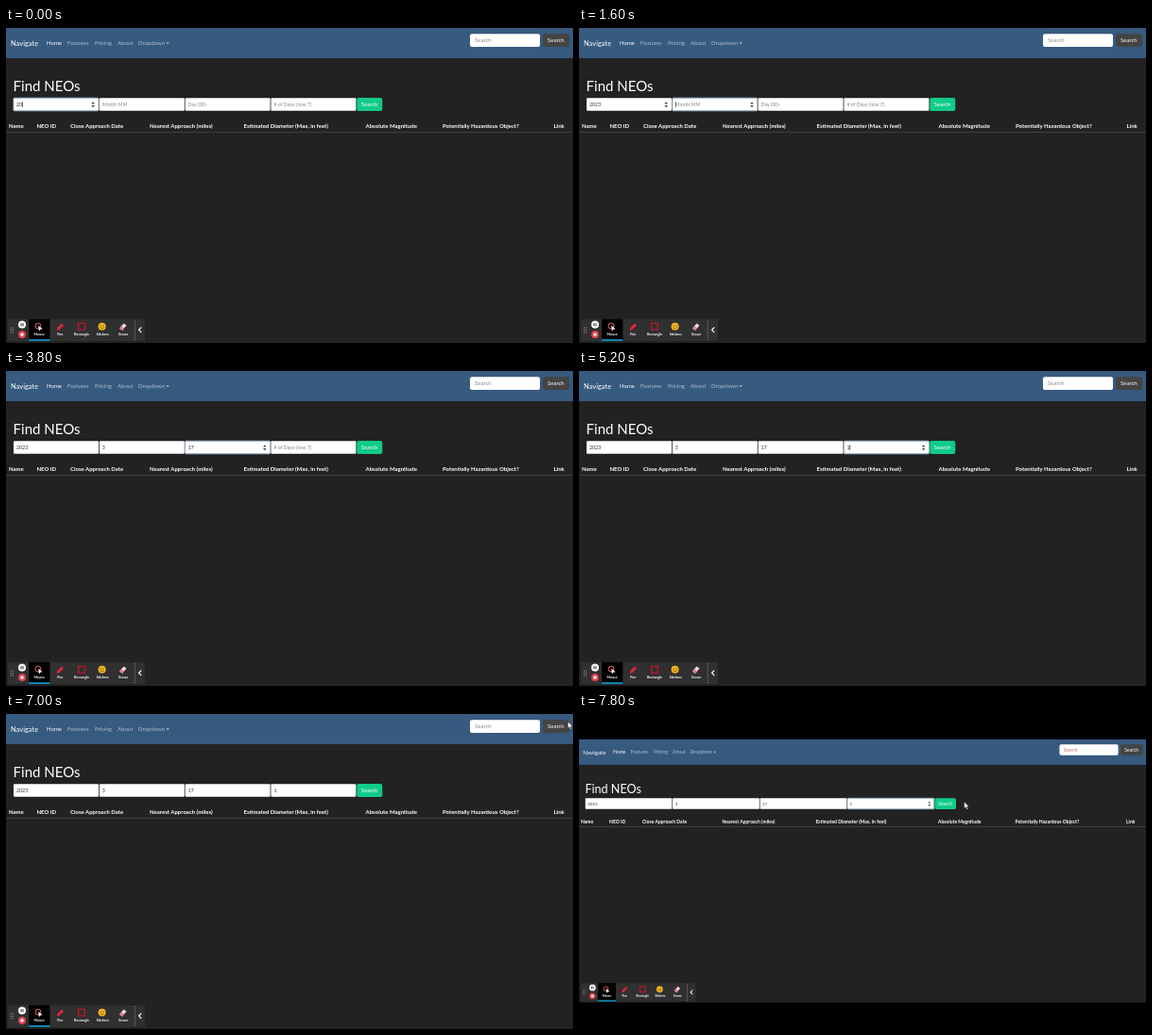
Recreate the animation shown at these times as an HTML page. Size 600x334 px, loop 8000 ms.

```html
<!DOCTYPE html>
<html lang="en">
<head>
<meta charset="utf-8">
<title>Find NEOs</title>
<style>
html, body { margin: 0; width: 100%; height: 100%; overflow: hidden; background: #000; }
svg { display: block; width: 100vw; height: 100vh; font-family: Lato, sans-serif; }
</style>
</head>
<body>
<svg id="stage" viewBox="0 0 600 334"></svg>
<script>
const LOOP = 8000, STEP = 200, ZOOM_OUT = 7200;
const stage = document.getElementById('stage');

// Page layouts: the zoomed-out one is wider and drawn smaller.
const wide = 600 / 0.84;
const near = { w: 600, h: 334, field: 90.8, heads: [3, 32.5, 68, 152, 251.5, 380.5, 462, 579.5] };
const far = { w: wide, h: 332, field: 110, heads: [2, 32, 67, 151.5, 250.5, 380, 461.5, 579].map(x => x / 0.84) };
const headNames = ['Name', 'NEO ID', 'Close Approach Date', 'Nearest Approach (miles)',
  'Estimated Diameter (Max, in feet)', 'Absolute Magnitude', 'Potentially Hazardous Object?', 'Link'];
const hints = ['Year YYYY', 'Month MM', 'Day DD-', '# of Days (max 7)'];

// [time, focused field, its value]
const typing = [[0, 0, '20'], [200, 0, '202'], [400, 0, '2023'], [1400, 1, ''], [1800, 1, '3'],
  [2600, 2, ''], [3000, 2, '1'], [3200, 2, '17'], [4600, 3, ''], [5000, 3, '1'],
  [6200, -1, ''], [7200, 3, '1']];

// [time, x, y] of the pointer tip
const nearPath = [[5400, 412, 98], [5600, 392, 81], [5800, 387, 79], [6200, 387, 79],
  [6600, 500, 42], [7000, 594.5, 8]];
const farPath = [[7200, 459.5, 80], [7400, 436, 86], [7600, 414, 92], [7800, 407.5, 93]];

const rect = (x, y, w, h, fill, more = '') =>
  `<rect x="${x}" y="${y}" width="${w}" height="${h}" fill="${fill}" ${more}/>`;
const text = (x, y, size, str, fill = '#fff', more = '') =>
  `<text x="${x}" y="${y}" font-size="${size}" fill="${fill}" ${more}>${str}</text>`;
const path = (d, fill, more = '') => `<path d="${d}" fill="${fill}" ${more}/>`;
const circle = (x, y, r, fill, more = '') => `<circle cx="${x}" cy="${y}" r="${r}" fill="${fill}" ${more}/>`;
const line = (d, color, width) => path(d, 'none', `stroke="${color}" stroke-width="${width}"`);

function along(points, t) {
  if (t < points[0][0]) return null;
  const i = points.findIndex(p => p[0] > t);
  if (i < 0) return points.at(-1).slice(1);
  const [a, b] = [points[i - 1], points[i]], k = (t - a[0]) / (b[0] - a[0]);
  return [a[1] + (b[1] - a[1]) * k, a[2] + (b[2] - a[2]) * k];
}

function formState(t) {
  const values = ['', '', '', ''];
  let focus = -1, since = 0;
  for (const [time, field, value] of typing) {
    if (time > t) break;
    focus = field;
    since = time;
    if (field >= 0) values[field] = value;
  }
  return { values, focus, caret: (t - since) % 1000 < 500 };
}

function navbar(w, hint) {
  const links = [[43, 'Home'], [65, 'Features'], [94, 'Pricing'], [118, 'About'], [140, 'Dropdown']];
  return rect(0, 0, w, 32, '#375a7f') + text(5, 18.8, 7.5, 'Navigate') +
    links.map(([x, s], i) => text(x, 18.2, 6, s, i ? '#afbdcc' : '#fff')).join('') +
    path('M169.3 15.3h3.6l-1.8 1.9z', '#afbdcc') +
    rect(w - 109, 6.3, 74, 13.7, '#fff', 'rx="2"') + text(w - 104, 15.4, 6, 'Search', hint) +
    rect(w - 32, 6.3, 28, 13.7, '#444', 'rx="2"') + text(w - 27, 15.4, 6, 'Search');
}

function form(step, t) {
  const { values, focus, caret } = formState(t);
  let out = '';
  values.forEach((value, i) => {
    const x = 8 + step * i, right = x + step - 0.8;
    const ring = i === focus ? 'stroke="#9fb3c8" stroke-width="1"' : '';
    out += rect(x, 74.2, step - 0.8, 13.6, '#fff', `rx="1" ${ring}`);
    out += text(x + 3, 83.1, 5.25, value || hints[i], value ? '#333' : '#888');
    if (i === focus && caret) out += rect(x + 3.1 + value.length * 3.05, 78.3, 0.6, 5.8, '#111');
    if (i === focus || (i === 0 && t < 3600))
      out += path(`M${right - 7.6} 80.4l1.8-2.2l1.8 2.2zm0 1.6h3.6l-1.8 2.2z`, '#444');
  });
  const x = 8 + step * 4;
  return out + rect(x, 74, 27, 14, '#10cc88', 'rx="2"') + text(x + 4.6, 83.2, 6, 'Search');
}

function toolbar() {
  const labels = [[35, 'Mouse'], [57.3, 'Pen'], [80, 'Rectangle'], [102.3, 'Stickers'], [124.3, 'Eraser']];
  let grip = '';
  for (let i = 0; i < 6; i++) grip += rect(5 + i % 2 * 2, 317.5 + (i >> 1) * 2.4, 1, 1, '#aaa');
  return rect(2, 308.7, 145, 23.3, '#303030') + rect(24, 308.7, 22.4, 23.3, '#000') +
    rect(24, 330.2, 22.4, 1.6, '#13a5dc') + grip +
    circle(17, 314.5, 4, '#fff') + rect(15.5, 312.8, 1, 3.4, '#333') + rect(17.5, 312.8, 1, 3.4, '#333') +
    circle(17, 325, 4, '#e2404f') + rect(15.5, 323.5, 3, 3, '#fff') +
    circle(34, 316, 3, 'none', 'stroke="#e8655f" stroke-width="1"') +
    path('M34.3 315.5l4.3 3.8l-2.3.2l-1.4 2z', '#fff') +
    path('M53.5 320.8l1-3l4.3-4.5l2.2 2l-4.4 4.5z', '#e02635') +
    rect(76.7, 313.2, 6.6, 6.8, 'none', 'stroke="#c9152b" stroke-width="1.2"') +
    circle(101.6, 316.6, 4, '#f5b921') + circle(100.2, 315.7, 0.6, '#57380c') + circle(103, 315.7, 0.6, '#57380c') +
    line('M99.6 317.6q2 2.2 4 0', '#57380c', 0.7) +
    path('M120 318.6l4.5-5.4l3 2.1l-4.5 5.4z', '#f3dada') + path('M120 318.6l2-2.4l3 2.1l-2 2.4z', '#e57982') +
    labels.map(([x, s]) => text(x, 326.4, 3.7, s, '#fff', 'font-weight="700" text-anchor="middle"')).join('') +
    path('M136.3 310v21', 'none', 'stroke="#999" stroke-width=".8" stroke-dasharray="1 1"') +
    line('M143.2 317.3l-2.6 2.8l2.6 2.8', '#fff', 1.2);
}

function page(view, t, hint) {
  return rect(0, 0, view.w, view.h, '#222') + navbar(view.w, hint) +
    text(7.6, 67.3, 15, 'Find NEOs') + form(view.field, t) +
    headNames.map((s, i) => text(view.heads[i], 106, 6, s, '#fff', 'font-weight="700"')).join('') +
    rect(0, 110, view.w, 0.7, '#505050');
}

function pointer(at) {
  if (!at) return '';
  return `<g transform="translate(${at})">` +
    path('M0 0v7.2l1.7-1.5l1.2 2.6l1.3-.6l-1.2-2.5h2.3z', '#fff', 'stroke="#111" stroke-width=".5"') + '</g>';
}

function scene(t) {
  if (t < ZOOM_OUT) return page(near, t, '#888') + toolbar() + pointer(along(nearPath, t));
  return rect(0, 0, 600, 334, '#000') +
    `<g transform="translate(0 27) scale(.84)">${page(far, t, '#b97474')}</g>` +
    `<g transform="translate(0 26) scale(.84)">${toolbar()}</g>` + pointer(along(farPath, t));
}

let shown = -1;
function draw() {
  const t = Math.floor(performance.now() % LOOP / STEP) * STEP;
  if (t !== shown) stage.innerHTML = scene(shown = t);
  requestAnimationFrame(draw);
}
draw();
</script>
</body>
</html>
```
